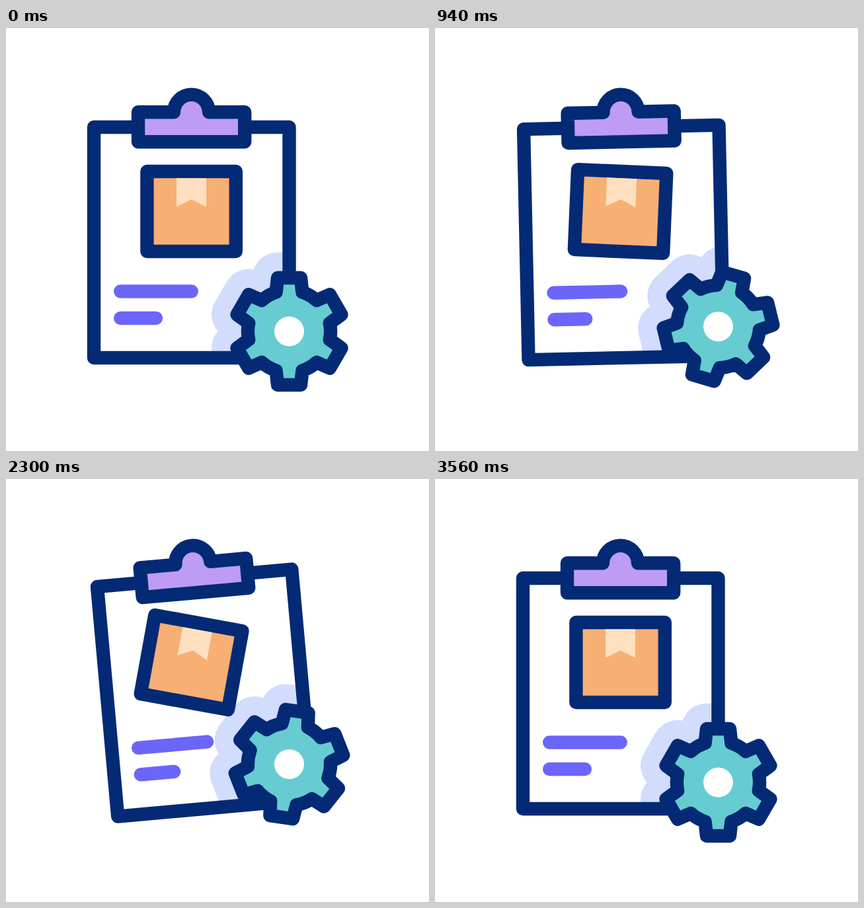
These frames come from a looping animation (640 px wide and 640 px high, 3600 ms). An HTML page:

```html
<!DOCTYPE html>
<html lang="en">
<head>
<meta charset="utf-8">
<title>Order processing</title>
<style>
  html, body { margin: 0; width: 100%; height: 100%; overflow: hidden; background: #fff; }
  svg { display: block; width: 100vw; height: 100vh; }
  .ink { stroke: #042a75; stroke-width: 20.4; stroke-linejoin: round; }
  .bar { stroke: #6b65f9; stroke-width: 20.4; stroke-linecap: round; }
</style>
</head>
<body>
<svg viewBox="0 0 640 640" fill="none">
  <defs>
    <path id="cog"/>
    <clipPath id="sheet"><rect id="sheetRect" x="133" y="150" width="295.5" height="349"/></clipPath>
  </defs>

  <g clip-path="url(#sheet)">
    <use id="halo" href="#cog" fill="#d2dcfd" stroke="#d2dcfd" stroke-width="77" stroke-linejoin="round"/>
  </g>

  <g id="board">
    <rect class="ink" x="133" y="150" width="295.5" height="349"/>
    <path class="ink" fill="#be9cf4" d="M200 127.3H254A26.5 26.5 0 0 1 307 127.3H361.2V172.3H200Z"/>
    <path id="bars" class="bar"/>
  </g>

  <g id="box">
    <rect class="ink" x="213.4" y="217" width="134.4" height="121" fill="#f7af74"/>
    <path fill="#fee0c0" d="M258 227.2H303V270.5L280.5 259.3L258 270.5Z"/>
  </g>

  <g id="gear">
    <use class="ink" href="#cog" fill="#66ccd1"/>
    <circle r="22.5" fill="#fff"/>
  </g>
</svg>
<script>
const LOOP = 3600;
const $ = id => document.getElementById(id);
const smooth = p => p * p * (3 - 2 * p);

// Eased value at time t from [time, value] steps.
function track(steps, t) {
  const i = steps.findIndex(s => s[0] > t);
  if (i < 0) return steps[steps.length - 1][1];
  const [t0, a] = steps[i - 1], [t1, b] = steps[i];
  return a + (b - a) * smooth((t - t0) / (t1 - t0));
}

// Swing between two extremes every 600 ms, then settle.
const swing = (a, b) => [[0, 0], [600, a], [1200, b], [1800, a], [2400, b]];
const boardTurn = [...swing(6, -6), [3000, 0]];
const boxTurn = [...swing(-12, 12), [3000, -12], [3560, 0]];
const gearTurn = [...swing(-80, 80), [3000, -80], [3560, 0]];
const gearDrop = [...swing(30, -32), [3000, 30], [3560, 0]];
const barTrim = Array.from({ length: 9 }, (_, i) => [i * 400, i % 2 ? 20.5 : 0]);

function cogPath() {
  const pt = (r, deg) => {
    const a = deg * Math.PI / 180;
    return `${(r * Math.sin(a)).toFixed(2)} ${(-r * Math.cos(a)).toFixed(2)}`;
  };
  const tip = 82.9, root = 62.6;
  let d = `M${pt(root, -18.5)}`;
  for (let a = 0; a < 360; a += 60) {
    d += `L${pt(tip, a - 12.2)}L${pt(tip, a + 12.2)}L${pt(root, a + 18.5)}`;
    d += `A${root} ${root} 0 0 1 ${pt(root, a + 41.5)}`;
  }
  return d + 'Z';
}

function draw(t) {
  const tilt = `rotate(${track(boardTurn, t)} 280.5 101)`;
  $('board').setAttribute('transform', tilt);
  $('sheetRect').setAttribute('transform', tilt);

  $('box').setAttribute('transform', `rotate(${track(boxTurn, t)} 280.6 277.5)`);

  const spin = `translate(428.5 ${459 + track(gearDrop, t)}) rotate(${track(gearTurn, t)})`;
  $('gear').setAttribute('transform', spin);
  $('halo').setAttribute('transform', spin);

  const cut = track(barTrim, t);
  $('bars').setAttribute('d', `M173.2 398.5H${280.7 - cut}M173.2 439H${226.9 - cut}`);
}

$('cog').setAttribute('d', cogPath());
draw(0);
const start = performance.now();
(function tick() {
  draw((performance.now() - start) % LOOP);
  requestAnimationFrame(tick);
})();
</script>
</body>
</html>
```
